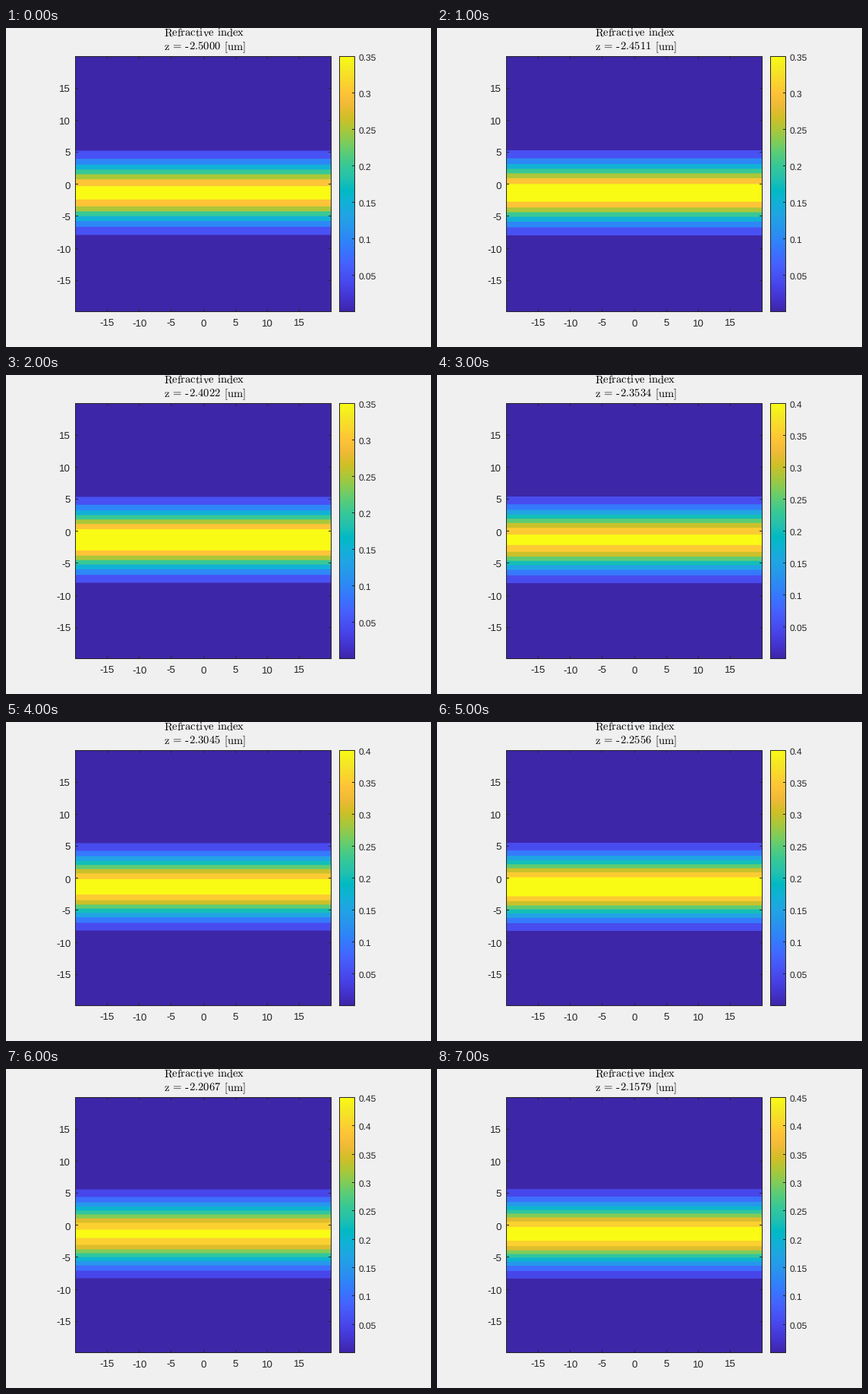
Write a matplotlib script that moves like this. It is 560 px wide and 420 px high and loops after 8000 ms.

```python
import numpy as np
import matplotlib.pyplot as plt
from matplotlib.animation import FuncAnimation
from matplotlib.colors import LinearSegmentedColormap
from matplotlib.patches import Rectangle

W, H, DPI = 560, 420, 100
plt.rcParams["font.family"] = "Liberation Sans"
plt.rcParams["mathtext.fontset"] = "cm"
plt.rcParams["text.hinting"] = "none"

INK = "#262626"
LEFT, RIGHT, TOP, BOTTOM = 91.5, 428.5, 37.5, 373.5
BAR_L, BAR_R = 439.5, 459.5
CX, CY, SCALE = 260, 205.6, 8.44     # plot origin and pixels per micron
MID, WAIST = 217.0, 39.28            # beam centre and 1/e half-width, pixels
STEP, MAX_LEVELS = 0.05, 9
EM = 11 * 96 / 72                    # title size in pixels

STOPS = """3e26a8 4332cb 4741e5 4852f4 4563fd 3875fe 2e87f7 2797eb 20a5e3
12b1d6 02bac3 24c1ae 37c897 57cc7a 81cc59 abc739 d1bf27 f0ba36 fec338
fad62d f5e924 f9fb15""".split()
CMAP = LinearSegmentedColormap.from_list("blue_yellow", ["#" + s for s in STOPS], 256)


def pt(px):
    return px * 72 / DPI


def pixel(v):
    """Centre of the pixel that holds v."""
    return np.floor(v) + 0.5


def line(xs, ys, color=INK, cap="butt"):
    return ax.plot(xs, ys, color=color, lw=pt(1), solid_capstyle=cap,
                   solid_joinstyle="miter", snap=False, zorder=5)[0]


def label(x, y, s, px, ha):
    return ax.text(x, y, s, fontsize=pt(px), color=INK, ha=ha, va="baseline")


def roman(x, y, math):
    return ax.text(x, y, f"${math}$", fontsize=pt(EM), color="black",
                   ha="left", va="baseline")


def frame_box(x0, x1):
    line([x0, x1, x1, x0, x0], [TOP, TOP, BOTTOM, BOTTOM, TOP], cap="projecting")


fig = plt.figure(figsize=(W / DPI, H / DPI), dpi=DPI, facecolor="#f0f0f0")
ax = fig.add_axes([0, 0, 1, 1])
ax.axis("off")

# Field and its contour bands
ax.add_patch(Rectangle((LEFT, TOP), RIGHT - LEFT, BOTTOM - TOP,
                       color=CMAP(0), lw=0, zorder=1))
bands = [ax.add_patch(Rectangle((92, MID), 336, 0, lw=0, snap=False,
                                zorder=2 + i / 10))
         for i in range(MAX_LEVELS)]

# Plot axes
for v in range(-15, 16, 5):
    x, y = CX + v * SCALE, CY - v * SCALE
    for edge, d in ((TOP, 3.5), (BOTTOM, -3.5)):
        line([pixel(x)] * 2, [edge, edge + d])
    for edge, d in ((LEFT, 3.5), (RIGHT, -3.5)):
        line([edge, edge + d], [pixel(y)] * 2)
    label(x, 393.3, str(v), 13.33, "center")
    label(85.3, y + 5.8, str(v), 13.33, "right")
frame_box(LEFT, RIGHT)

# Colour bar
ax.imshow(np.linspace(1, 0, 256)[:, None], cmap=CMAP, aspect="auto",
          extent=(BAR_L - 0.5, BAR_R + 0.5, BOTTOM + 0.5, TOP - 0.5),
          interpolation="nearest")
frame_box(BAR_L, BAR_R)
bar_ticks = [line([BAR_R - 3.5, BAR_R], [0, 0]) for _ in range(MAX_LEVELS)]
bar_labels = [label(464.5, 0, f"{STEP * (i + 1):g}", 12, "left")
              for i in range(MAX_LEVELS)]

# Title: word offsets in em
roman(207.6, 11, r"\text{Refractive}")
roman(207.6 + 4.794 * EM, 11, r"\text{index}")
TX = 208.4
roman(TX, 29, r"\text{z}\hspace{0.379}\text{=}")
line([TX + 1.9 * EM, TX + 2.164 * EM], [25.5, 25.5], "black")
depth = roman(TX + 2.221 * EM, 29, r"\text{2.5000}")
roman(TX + 5.332 * EM, 29, r"\text{[um]}")

ax.set_xlim(0, W)
ax.set_ylim(H, 0)


def update(k):
    z = -2.5 + k * 50 / 1023
    peak = np.exp(-(z / 2.5) ** 2)
    n = int(peak / STEP)
    depth.set_text(r"$\text{%.4f}$" % abs(z))
    for i in range(MAX_LEVELS):
        shown = i < n
        for artist in (bands[i], bar_ticks[i], bar_labels[i]):
            artist.set_visible(shown)
        if not shown:
            continue
        half = WAIST * np.sqrt(np.log(peak / (STEP * (i + 1))))
        bands[i].set_y(MID - half)
        bands[i].set_height(2 * half)
        bands[i].set_facecolor(CMAP((i + 1) / n))
        y = BOTTOM - (BOTTOM - TOP) * (i + 1) / n
        bar_ticks[i].set_ydata([pixel(y)] * 2)
        bar_labels[i].set_y(y + 5.3)
    return []


anim = FuncAnimation(fig, update, frames=8, interval=1000, repeat=True,
                     repeat_delay=0, init_func=lambda: update(0))
plt.show()
```
